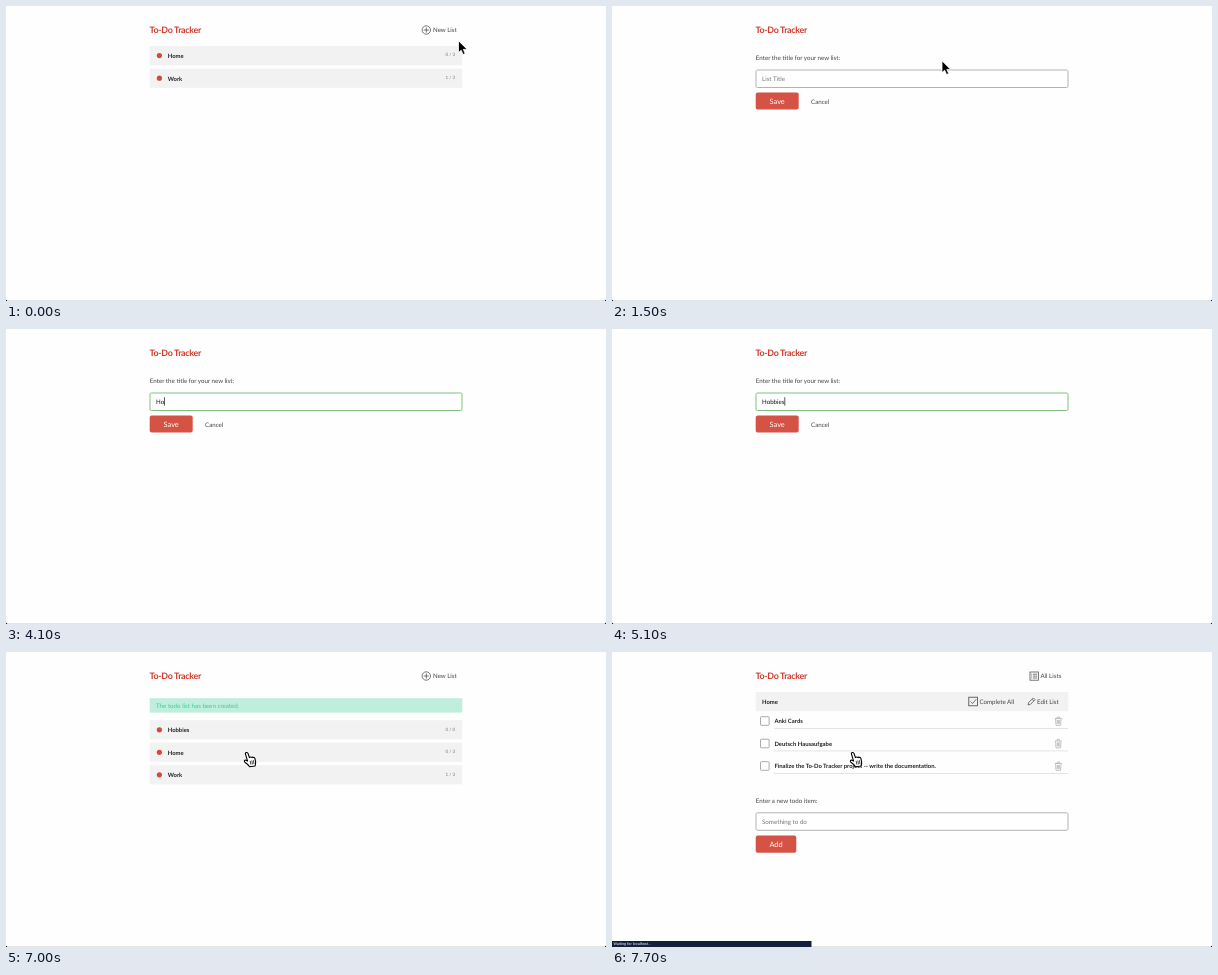
An HTML page that plays this animation: 600 by 295 pixels, repeating every 8 s.

```html
<!DOCTYPE html>
<html lang="en">
<head>
<meta charset="utf-8">
<title>To-Do Tracker</title>
<style>
  html, body { margin: 0; width: 100%; height: 100%; overflow: hidden; background: #fefefe; }
  svg { display: block; width: 600px; height: 295px; }
  text { font: 6.2px Lato, "Open Sans", sans-serif; fill: #444; text-rendering: geometricPrecision; white-space: pre; }
  .title { font-size: 8.9px; font-weight: 700; letter-spacing: -.3px; fill: #d0392b; }
  .bold { font-size: 5.9px; font-weight: 700; fill: #222; }
  .count { font-size: 4.5px; fill: #777; text-anchor: end; }
  .hint { fill: #777; }
  .typed { fill: #111; }
  .flash { fill: #45c79c; }
  .button { font-size: 7.4px; fill: #fff; text-anchor: middle; }
  .status { font: 3.75px Roboto, "Open Sans", sans-serif; fill: #fff; }
  .line { fill: none; stroke: #555; stroke-width: .8; }
  .bin { fill: none; stroke: #aaa; stroke-width: .7; }
  .hot text { fill: #d0392b; }
</style>
</head>
<body>
<svg id="stage" viewBox="0 0 600 295" xmlns="http://www.w3.org/2000/svg"></svg>
<script>
const LOOP = 8000, STEP = 100;

const text = (x, y, s, cls = "") => `<text x="${x}" y="${y}" class="${cls}">${s}</text>`;
const rect = (x, y, w, h, fill, extra = "") =>
  `<rect x="${x}" y="${y}" width="${w}" height="${h}" fill="${fill}" ${extra}/>`;
const path = (d, cls = "line") => `<path d="${d}" class="${cls}"/>`;
const group = (id, body) => `<g id="${id}">${body}</g>`;

const bar = y => rect(143.7, y, 312.6, 19.2, "#f2f2f2");
const button = (y, w, label) =>
  rect(143.7, y, w, 17.2, "#d45345", 'rx="2"') + text(143.7 + w / 2, y + 11.3, label, "button");
const field = (y, id) =>
  rect(144, y, 312, 17.5, "#fff", `id="${id}" rx="1.5" stroke="#aaa" stroke-width=".9"`);

const listRow = (y, name, count) => bar(y) +
  `<circle cx="153.4" cy="${y + 9.6}" r="2.6" fill="#d14a3c"/>` +
  text(161.7, y + 11.9, name, "bold") + text(449, y + 10.4, count, "count");

const newLink = id => group(id,
  '<circle cx="420.3" cy="24" r="4.2" class="line"/>' + path("M417.7 24h5.2M420.3 21.4v5.2") +
  text(427, 26.4, "New List"));

const bin = y => path(`M442.8 ${y + 1.8}h7M445 ${y + 1.6}v-1.2h2.6v1.2M443.6 ${y + 2}l.4 6.6h4.6l.4-6.6` +
  `M445.3 ${y + 3.2}v4M446.3 ${y + 3.2}v4M447.3 ${y + 3.2}v4`, "bin");

const todo = (y, name) =>
  rect(148.5, y, 8.6, 8.6, "#fff", 'rx=".8" stroke="#888" stroke-width=".7"') +
  text(162.4, y + 6.5, name, "bold") + rect(162, y + 11.4, 294, .7, "#d8d8d8") + bin(y);

const lists = newLink("link") + listRow(40, "Home", "0 / 3") + listRow(62.6, "Work", "1 / 3");

const form = text(143.8, 53.6, "Enter the title for your new list:") + field(64, "input") +
  text(150, 74.8, "List Title", "hint").replace("<text", '<text id="hint"') +
  '<text id="typed" class="typed" x="150" y="74.8"></text>' +
  rect(0, 68.2, .7, 8.4, "#111", 'id="caret"') +
  button(86.4, 43, "Save") + text(199, 97.6, "Cancel");

const created = newLink("link2") + rect(143.7, 46.2, 312.6, 14.4, "#bfeedc") +
  text(150, 55.7, "The todo list has been created.", "flash") +
  listRow(68.2, "Hobbies", "0 / 0") + listRow(90.7, "Home", "0 / 3") + listRow(113.2, "Work", "1 / 3");

const todos = rect(418, 20, 8.4, 8.2, "none", 'stroke="#555" stroke-width=".8"') +
  path("M419.2 22.2h1M421 22.2h4.2M419.2 24.1h1M421 24.1h4.2M419.2 26h1M421 26h4.2") +
  text(428.4, 26.4, "All Lists") + bar(40) + text(150, 51.8, "Home", "bold") +
  rect(356.8, 45.2, 8.6, 8.6, "none", 'stroke="#444" stroke-width=".8"') +
  path("M358.6 49.4l2 2.2 3.6-4.4") + text(367.4, 52, "Complete All") +
  path("M416 53l.7-2.5 4.6-4.6 1.8 1.8-4.6 4.6zM420 47.2l1.8 1.8") + text(425, 52, "Edit List") +
  todo(64.7, "Anki Cards") + todo(87.2, "Deutsch Hausaufgabe") +
  todo(109.7, "Finalize the To-Do Tracker project -- write the documentation.") +
  text(143.8, 151.2, "Enter a new todo item:") + field(160.8, "item") +
  text(150, 172, "Something to do", "hint") + button(183.5, 40.6, "Add");

// Each pointer has its hot spot at the origin.
const outline = 'stroke-linejoin="round" stroke-linecap="round"';
const pointers = {
  arrow: `<path d="M0 0V11.6L2.7 9.2 4.6 13.5 6.7 12.6 4.8 8.4H8.5Z" fill="#000" stroke="#fff" stroke-width=".8" ${outline}/>`,
  hand: `<path d="M-1.4 1.2Q-1.3-.2 0-.1Q1 0 1.4 1.2L2.6 5Q3.4 4 4.5 4.8Q5.5 4 6.3 5Q7.5 4.4 8.1 5.8L8.8 9Q9 11 8.2 13.4L2.8 14.2Q1 11.3-2 9.6Q-3.1 8.2-1.5 7.5L.8 8.5Z" fill="#fff" stroke="#000" stroke-width="1.1" ${outline}/>` +
    `<path d="M3.4 8.6l.6 3M5.1 8.3l.5 3M6.7 8l.4 3" fill="none" stroke="#000" stroke-width=".7" ${outline}/>`,
  beam: `<path d="M-2.2-6.2Q0-6.2 0-4.8Q0-6.2 2.2-6.2M0-5V5M-2.2 6.2Q0 6.2 0 4.8Q0 6.2 2.2 6.2M-1.2 1.6H1.2" fill="none" stroke="#000" stroke-width="1.3" ${outline}/>`
};

const screens = { lists, form, created, todos };
const stage = document.getElementById("stage");
stage.innerHTML = rect(0, 0, 600, 295, "#fefefe") + rect(0, 294.4, 600, .6, "#d4d4d4") +
  path("M0 293.6L1.4 295H0Z", "") + path("M600 293.6L598.6 295H600Z", "") +
  text(143.5, 27, "To-Do Tracker", "title") +
  Object.entries(screens).map(([id, body]) => group(id, body)).join("") +
  group("bar", rect(0, 289, 1, 6, "#14203c", 'id="barBox"') + '<text id="barText" class="status" x="1.6" y="293.4"></text>') +
  Object.entries(pointers).map(([id, body]) => group(id, body)).join("");

const $ = id => document.getElementById(id);
const show = (id, on) => { $(id).style.display = on ? "" : "none"; };

// Tables: [start time, values...]
const screenSteps = [[0, "lists"], [1100, "form"], [5600, "created"], [7700, "todos"]];
const pointerSteps = [[0, "arrow"], [300, "hand"], [1400, "arrow"], [1600, "beam"], [4000, ""], [6500, "hand"]];
const typedSteps = [[0, ""], [4000, "H"], [4100, "Ho"], [4300, "Hob"], [4500, "Hobb"],
  [4700, "Hobbi"], [4800, "Hobbie"], [5000, "Hobbies"]];
const borderSteps = [[0, "#aaa"], [1900, "#8fb08f"], [2000, "#72b872"]];
const caretSteps = [[0, false], [1900, true], [2400, false], [2900, true], [3400, false], [3900, true]];
const waiting = "Waiting for localhost...";
const barSteps = [[0, "", 0, 0], [600, "localhost:3000/lists/new", 47, .5], [700, "localhost:3000/lists/new", 47, 1],
  [1100, waiting, 199.5, 1], [1400, waiting, 199.5, .5], [1500, "", 0, 0],
  [7200, "localhost:3000/lists/1", 42, .5], [7300, "localhost:3000/lists/1", 42, 1], [7700, waiting, 199.5, 1]];
const track = [[0, 452.5, 35], [100, 452, 35], [300, 444, 32.5], [600, 434.8, 30.4], [1300, 434.8, 30.4],
  [1400, 405, 38], [1500, 330, 55], [1600, 268, 70], [1700, 248.6, 73.4], [6400, 241.5, 75],
  [6500, 241.5, 76], [6700, 241, 84], [7000, 240.8, 100.6]];

const at = (steps, t) => steps.filter(s => s[0] <= t).pop();

function place(t) {
  const i = track.findIndex(k => k[0] > t);
  if (i < 0) return track[track.length - 1].slice(1);
  const [t0, x0, y0] = track[i - 1], [t1, x1, y1] = track[i];
  const p = (t - t0) / (t1 - t0);
  return [x0 + (x1 - x0) * p, y0 + (y1 - y0) * p];
}

function draw(t) {
  const screen = at(screenSteps, t)[1], pointer = at(pointerSteps, t)[1];
  const [x, y] = place(t);
  for (const id in screens) show(id, id === screen);
  for (const id in pointers) {
    show(id, id === pointer);
    $(id).setAttribute("transform", `translate(${x} ${y})`);
  }
  $("link").setAttribute("class", t >= 400 ? "hot" : "");

  const typed = at(typedSteps, t)[1];
  $("typed").textContent = typed;
  show("hint", !typed);
  show("caret", at(caretSteps, t)[1]);
  $("caret").setAttribute("x", 150 + (typed && screen === "form" ? $("typed").getComputedTextLength() : 0));
  $("input").setAttribute("stroke", at(borderSteps, t)[1]);

  const [, label, width, alpha] = at(barSteps, t);
  $("barText").textContent = label;
  $("barBox").setAttribute("width", width);
  $("bar").setAttribute("opacity", alpha);
}

const start = performance.now();
function tick() {
  const t = (performance.now() - start) % LOOP;
  draw(Math.floor(t / STEP) * STEP);
  requestAnimationFrame(tick);
}
tick();
</script>
</body>
</html>
```
